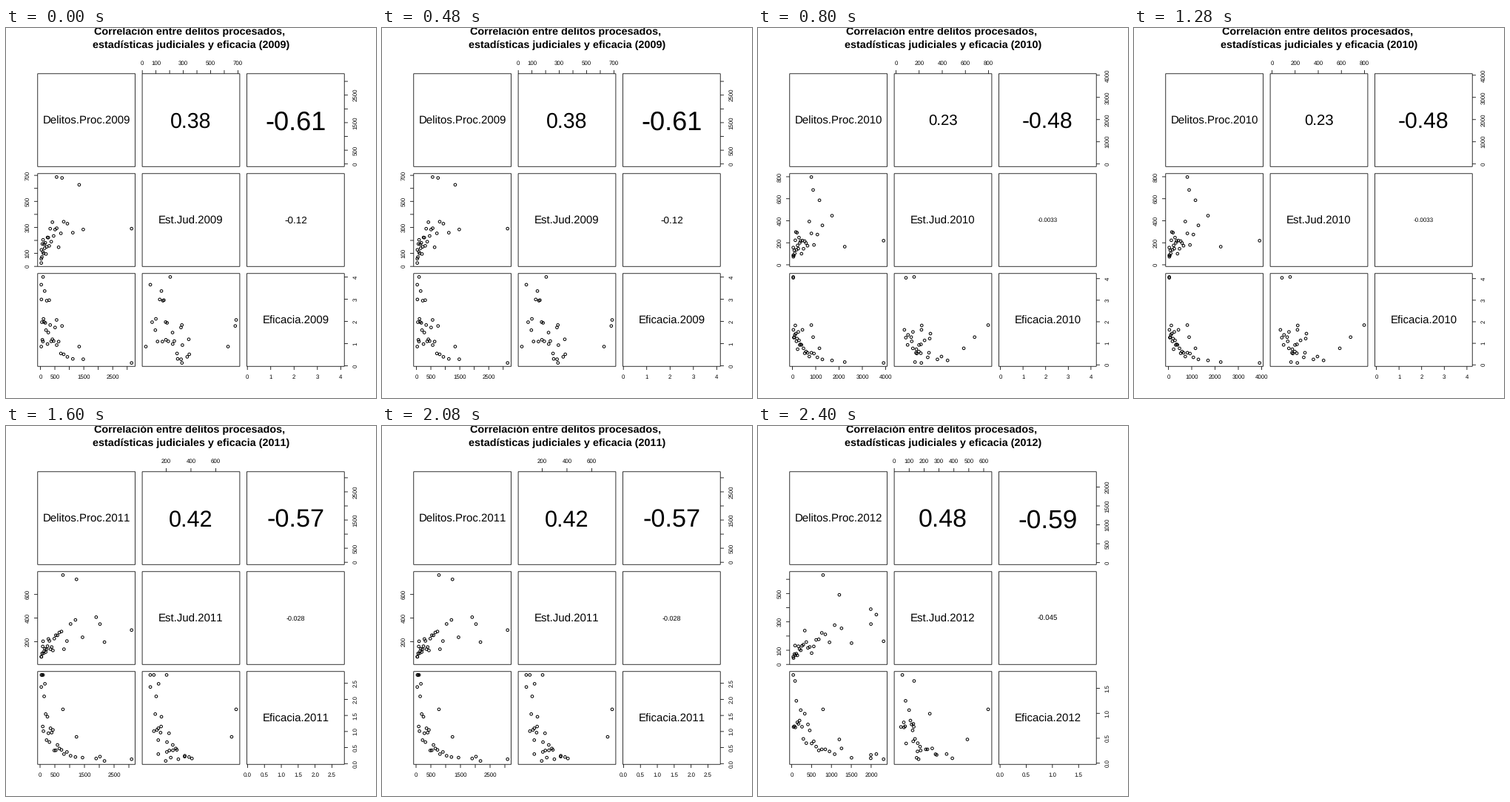
These frames come from a looping animation (500x500 px, 3200 ms). A matplotlib script:

```python
import matplotlib.pyplot as plt
import numpy as np
from matplotlib.animation import ArtistAnimation
from matplotlib.collections import PatchCollection
from matplotlib.patches import Circle, Rectangle

# Smooth text with plain letter spacing
plt.rcParams.update({"text.hinting": "none", "text.kerning_factor": 6})

SIZE = 500
PX = 0.72            # points per pixel at 100 dpi
THIN = 0.8 * PX
LINE = 9.504         # height of one margin line
LABEL = 7.92         # axis label size
PITCH_X, PITCH_Y = 141.32, 134.99
COLS = [(42.77 + PITCH_X * i, 174.59 + PITCH_X * i) for i in range(3)]
ROWS = [(61.78 + PITCH_Y * i, 187.26 + PITCH_Y * i) for i in range(3)]
PANEL = COLS[0][1] - COLS[0][0]
PAD = 0.04           # free margin around the data, as a share of its range
COUNT = 32
DIAGONAL = ["Delitos.Proc.", "Est.Jud.", "Eficacia."]

# scales: (min, max, tick step) of crimes, courts, rate
# cloud: spread of crimes, rate at zero, its decay, courts at zero, its growth
# outliers: (crimes, courts, rate) as shares of their ranges
YEARS = {
    2009: dict(
        scales=[(30, 3152, 500), (26, 687, 100), (0.13, 4, 1)],
        cors=["0.38", "-0.61", "-0.12"],
        cloud=(0.13, 0.62, 7, 0.08, 0.6),
        outliers=[(0.02, 0.27, 1), (0, 0.05, 0.91), (0.17, 1, 0.5), (0.23, 0.99, 0.43),
                  (0.42, 0.91, 0.19), (1, 0.4, 0), (0, 0, 0.19)]),
    2010: dict(
        scales=[(37, 3912, 1000), (16, 797, 200), (0.09, 4.08, 1)],
        cors=["0.23", "-0.48", "-0.0033"],
        cloud=(0.12, 0.42, 8, 0.08, 0.4),
        outliers=[(0, 0.18, 1), (0, 0.09, 0.99), (0.2, 1, 0.44), (0.22, 0.85, 0.3),
                  (0.29, 0.73, 0.17), (0.57, 0.19, 0.01), (1, 0.26, 0)]),
    2011: dict(
        scales=[(41, 3092, 500), (36, 764.7, 200), (0.085, 2.76, 0.5)],
        cors=["0.42", "-0.57", "-0.028"],
        cloud=(0.17, 0.6, 7, 0.05, 0.42),
        outliers=[(0.02, 0.23, 1), (0, 0.05, 0.86), (0.24, 1, 0.6), (0.39, 0.95, 0.28),
                  (0.65, 0.43, 0.05), (0.7, 0.22, 0), (1, 0.36, 0.02)]),
    2012: dict(
        scales=[(40, 2313, 500), (24, 630, 100), (0.045, 1.77, 0.5)],
        cors=["0.48", "-0.59", "-0.045"],
        cloud=(0.24, 0.5, 4, 0.03, 0.38),
        outliers=[(0, 0.05, 1), (0.02, 0.18, 0.93), (0.33, 1, 0.6), (0.51, 0.77, 0.25),
                  (0.86, 0.43, 0.07), (0.92, 0.54, 0.08), (1, 0.23, 0.02)]),
}

fig = plt.figure(figsize=(5, 5), dpi=100, facecolor="white")
ax = fig.add_axes([0, 0, 1, 1])
ax.set_xlim(0, SIZE)
ax.set_ylim(SIZE, 0)
ax.axis("off")


def em_width(text):
    """Width of a number in ems."""
    return sum({"-": 0.333, ".": 0.278}.get(c, 0.556) for c in text)


def write(x, y, text, size, **kw):
    return ax.text(x, y, text, fontsize=size * PX, family="Liberation Sans",
                   ha="center", va="baseline", rotation_mode="anchor", **kw)


def centred(row, col, text, size):
    x, y = np.mean(COLS[col]), np.mean(ROWS[row])
    return write(x, y + 0.36 * size, text, size)


def place(share, span):
    """Stage position of a share of the data range within a panel span."""
    return span[0] + (span[1] - span[0]) * (share + PAD) / (1 + 2 * PAD)


def axis(side, span, scale):
    """Ticks and labels on one side; labels that would crowd are skipped."""
    low, high, step = scale
    pad = PAD * (high - low)
    first = np.ceil((low - pad) / step)
    last = np.floor((high + pad) / step)
    values = np.arange(first, last + 1) * step + 0.0
    level = side in ("top", "bottom")
    out = 1 if side in ("bottom", "right") else -1
    edge = {"top": ROWS[0][0], "bottom": ROWS[2][1],
            "left": COLS[0][0], "right": COLS[2][1]}[side]
    base = edge + (1.8 if out > 0 else -1.2) * LINE
    artists, limit = [], -np.inf
    for v in values:
        share = (v - low) / (high - low)
        p = place(share, span if level else span[::-1])
        text = f"{v:.1f}" if step < 1 else f"{v:.0f}"
        half = em_width(text) * LABEL / 2
        along, across = [p, p], [edge, edge + out * LINE / 2]
        ends = (along, across) if level else (across, along)
        artists += ax.plot(*ends, color="black", lw=THIN, snap=False,
                           solid_capstyle="butt")
        start = p if level else -p
        if start - half >= limit:
            limit = start + half + 0.833 * LABEL
            spot = (p, base) if level else (base, p)
            artists.append(write(*spot, text, LABEL, rotation=0 if level else 90))
    return artists


def sample(year, cloud, outliers):
    """Skewed crimes; courts grow with them and the rate decays."""
    spread, rate0, decay, courts0, growth = cloud
    rng = np.random.default_rng(year)
    n = COUNT - len(outliers)
    crimes = -spread * np.log(1 - (np.arange(n) + 0.3) / n)
    noise = np.exp(rng.normal(0, 0.35, (2, n)))
    courts = (courts0 + growth * np.sqrt(crimes)) * noise[0]
    rate = rate0 * np.exp(-decay * crimes) * noise[1] + 0.015
    points = np.column_stack([crimes, courts, rate])
    return np.clip(np.vstack([points, outliers]), 0, 1).T


def scatter(crimes, courts, rate):
    pairs = [(crimes, courts, 0, 1), (crimes, rate, 0, 2), (courts, rate, 1, 2)]
    rings = [Circle(spot, 1.8)
             for a, b, col, row in pairs
             for spot in zip(place(a, COLS[col]), place(b, ROWS[row][::-1]))]
    return ax.add_collection(PatchCollection(
        rings, facecolor="none", edgecolor="black", lw=PX))


def page(year, scales, cors, cloud, outliers):
    crimes, courts, rate = scales
    artists = [write(250, 26.6, f"estadísticas judiciales y eficacia ({year})",
                     14.4, weight="bold"),
               scatter(*sample(year, cloud, outliers))]
    for i, name in enumerate(DIAGONAL):
        artists.append(centred(i, i, f"{name}{year}", 15.03))
    for (row, col), text in zip([(0, 1), (0, 2), (1, 2)], cors):
        size = LABEL + 0.8 * PANEL * abs(float(text)) / em_width(text)
        artists.append(centred(row, col, text, size))
    artists += axis("bottom", COLS[0], crimes) + axis("right", ROWS[0], crimes)
    artists += axis("top", COLS[1], courts) + axis("left", ROWS[1], courts)
    artists += axis("bottom", COLS[2], rate) + axis("right", ROWS[2], rate)
    return artists


write(248, 9.3, "Correlación entre delitos procesados,", 14.4, weight="bold")
for left, right in COLS:
    for top, bottom in ROWS:
        ax.add_patch(Rectangle((left, top), right - left, bottom - top, fill=False,
                               edgecolor="black", lw=THIN, snap=False))

anim = ArtistAnimation(fig, [page(y, **spec) for y, spec in YEARS.items()],
                       interval=800, repeat=True, repeat_delay=0)
plt.show()
```
